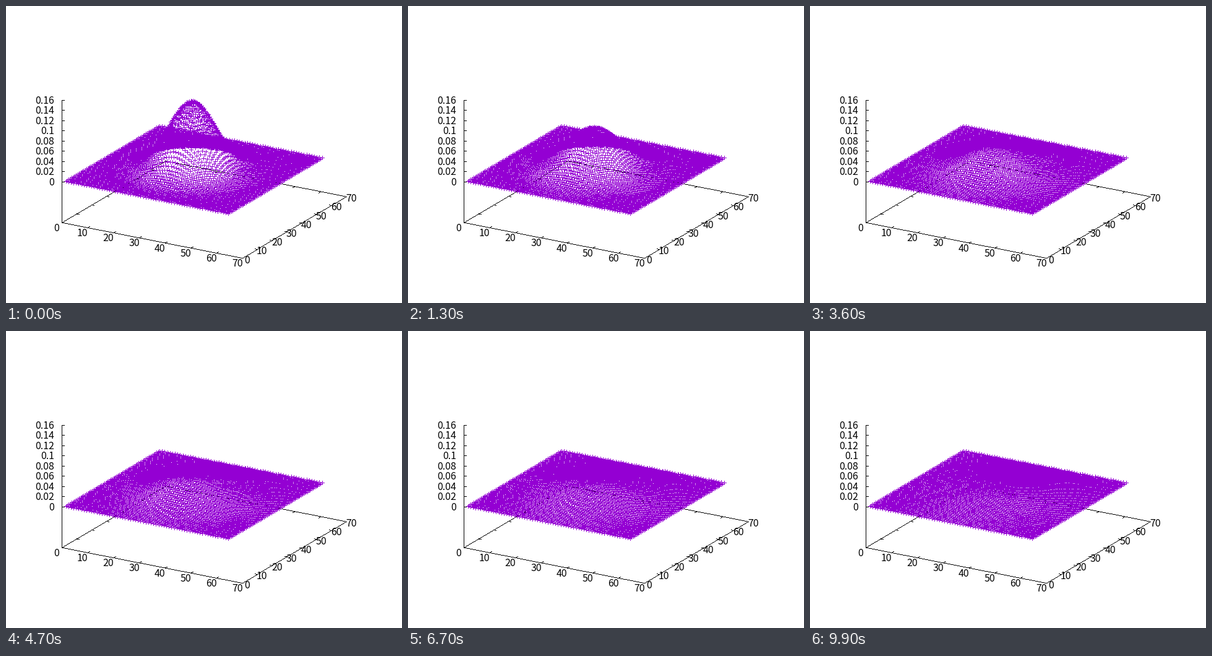
A matplotlib script for the animation above (10 s loop, 640 by 480 pixels).

```python
import numpy as np
import matplotlib.pyplot as plt
from matplotlib.animation import FuncAnimation

W, H, DPI = 640, 480, 100
FRAMES, INTERVAL = 100, 100
PURPLE = (0x94, 0x00, 0xD3)
BLACK = (0, 0, 0)

# Oblique projection of the 70 x 70 x 0.16 box
ORIGIN = np.array([90.0, 349.7])
XV = np.array([291.6, 57.5]) / 70
YV = np.array([168.4, -99.5]) / 70
Z0, ZSCALE = 66.0, 825.0

# Heat kernel: mid-slice of a spherical Gaussian spreading between cold walls
N, CENTRE, PEAK = 64, 32, 0.1343
VAR0, RATE = 66.0, 2.0


def base(x, y):
    return ORIGIN + x * XV + y * YV


def profile(var):
    """One-dimensional bell with mirror images that keep the walls at zero."""
    x = np.arange(1, N + 1)
    span = 2 * (N - 1)
    total = np.zeros(N)
    for k in (-1, 0, 1):
        total += np.exp(-(x - CENTRE - k * span) ** 2 / (2 * var))
        total -= np.exp(-(x - 2 + CENTRE - k * span) ** 2 / (2 * var))
    return total * np.sqrt(VAR0 / var)


def surface(n):
    f = profile(VAR0 + RATE * n)
    return PEAK * f[CENTRE - 1] * np.outer(f, f)


def pixel(v):
    return np.floor(np.asarray(v) + 0.5).astype(int)


def line(img, p, q):
    """One-pixel line without smoothing."""
    steps = int(np.ceil(np.abs(np.subtract(q, p)).max()))
    t = np.linspace(0, 1, steps + 1)[:, None]
    x, y = pixel(np.asarray(p) * (1 - t) + np.asarray(q) * t).T
    img[y, x] = BLACK


gx, gy = np.meshgrid(np.arange(1, N + 1), np.arange(1, N + 1), indexing="ij")
sx = ORIGIN[0] + gx * XV[0] + gy * YV[0]
sy = ORIGIN[1] - Z0 + gx * XV[1] + gy * YV[1]
cols = pixel(sx)


fig = plt.figure(figsize=(W / DPI, H / DPI), dpi=DPI, facecolor="white")
ax = fig.add_axes([0, 0, 1, 1])
ax.axis("off")


def label(x, y, text, ha="center"):
    ax.text(x, y + 6, text, ha=ha, va="baseline", color="black",
            family="Noto Sans CJK JP", fontsize=16 * 72 / DPI)


# Box, ticks and numbers
frame = np.full((H, W, 3), 255, np.uint8)
corners = [base(0, 0), base(70, 0), base(70, 70), base(0, 70)]
for p, q in zip(corners, corners[1:] + corners[:1]):
    line(frame, p, q)
line(frame, ORIGIN, ORIGIN - (0, 198))

along_x = XV / np.hypot(*XV) * 4
along_y = YV / np.hypot(*YV) * 4
for v in range(0, 71, 10):
    front, right = base(v, 0), base(70, v)
    if 0 < v < 70:
        line(frame, front, front + along_y)
        line(frame, base(v, 70), base(v, 70) - along_y)
        line(frame, right, right - along_x)
        line(frame, base(0, v), base(0, v) + along_x)
    label(front[0] - 8, front[1] + 8, str(v))
    label(right[0] + 8, right[1] + 2.5, str(v))

for i in range(9):
    z = i * 0.02
    y = ORIGIN[1] - Z0 - z * ZSCALE
    line(frame, (ORIGIN[0], y), (ORIGIN[0] + 4, y))
    label(78, y, f"{z:.2g}", ha="right")


def paint(n):
    """Stamp a 7-pixel plus at every grid point."""
    rows = pixel(sy - ZSCALE * surface(n))
    img = frame.copy()
    for d in range(-3, 4):
        img[rows + d, cols] = PURPLE
        img[rows, cols + d] = PURPLE
    return img


points = ax.imshow(paint(0), extent=(0, W, H, 0), interpolation="nearest",
                   aspect="auto")
ax.set_xlim(0, W)
ax.set_ylim(H, 0)


def update(n):
    points.set_data(paint(n))
    return (points,)


anim = FuncAnimation(fig, update, frames=FRAMES, interval=INTERVAL,
                     repeat=True, repeat_delay=0, blit=False)
plt.show()
```
